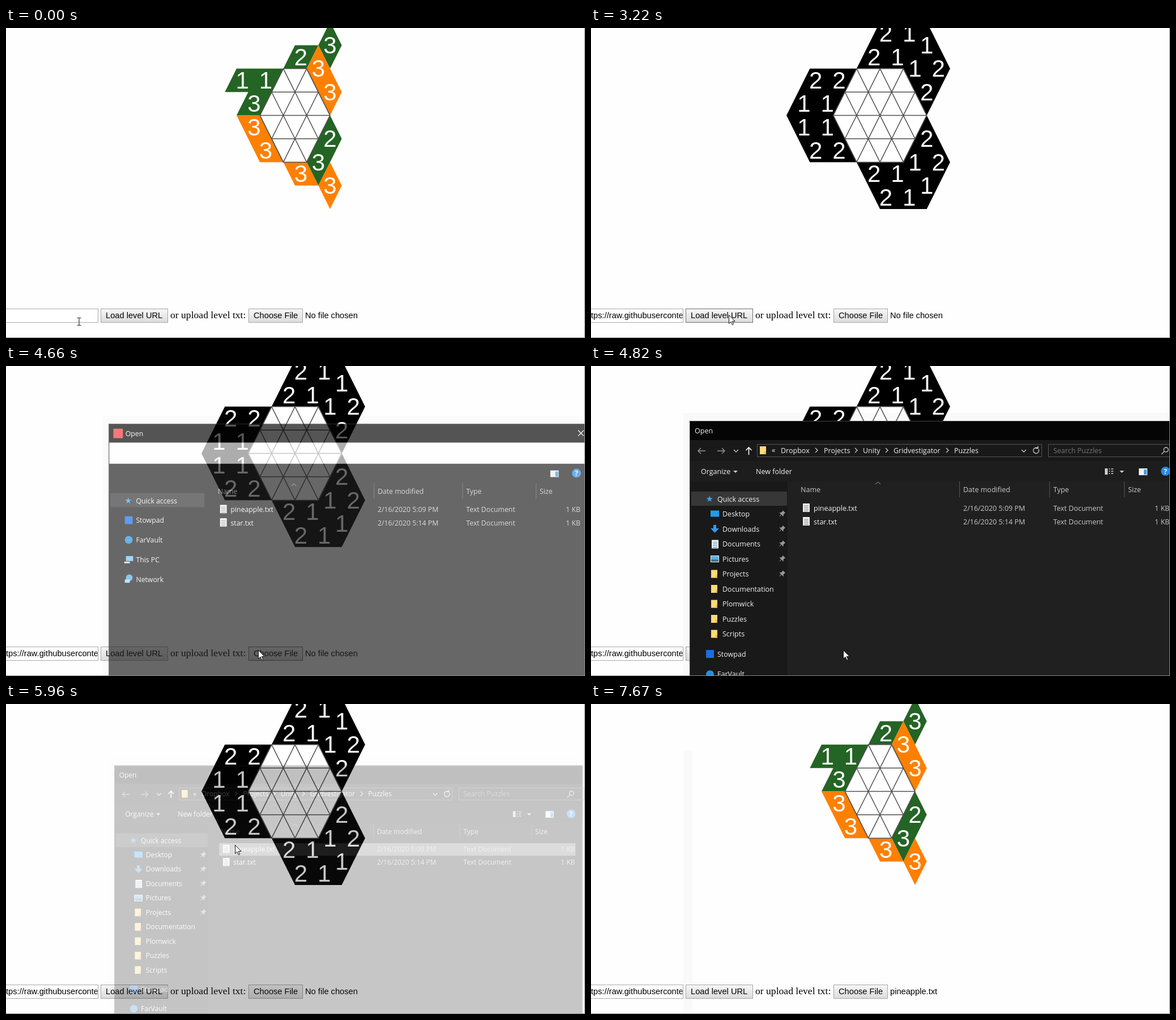
An HTML page that plays this animation: 1022 px wide and 548 px high, repeating every 7.85 s.

```html
<!DOCTYPE html>
<html lang="en">
<head>
<meta charset="utf-8">
<title>Level loader</title>
<style>
  html, body { margin: 0; width: 100%; height: 100%; overflow: hidden; background: #fefefe; }
  svg { display: block; }
  text { white-space: pre; }
  .digit { font: 42px "Liberation Sans", Arial, sans-serif; fill: #fff; text-anchor: middle; }
  .ui { font: 14.667px "Liberation Sans", Arial, sans-serif; }
  .serif { font: 17.6px "Liberation Serif", "Times New Roman", serif; }
  #dialog { font: 12.5px "Open Sans", "Noto Sans", sans-serif; fill: #f2f2f2; }
  #dialog .dim { fill: #c8c8c8; }
  .line { fill: none; stroke: #ccc; stroke-width: 1.3; }
</style>
</head>
<body>
<svg id="stage" width="1022" height="548" viewBox="0 0 1022 548"></svg>
<script>
const LOOP = 7850, STEP = 60;
const GREEN = '#246424', ORANGE = '#ff8000';
const $ = id => document.getElementById(id);
const show = (id, on) => $(id).setAttribute('visibility', on ? 'inherit' : 'hidden');
const text = (x, y, s, attrs = '') => `<text x="${x}" y="${y}" ${attrs}>${s}</text>`;
const rect = (x, y, w, h, fill, attrs = '') =>
  `<rect x="${x}" y="${y}" width="${w}" height="${h}" fill="${fill}" ${attrs}/>`;
const line = (d, attrs = '') => `<path class="line" d="${d}" ${attrs}/>`;

// ---- puzzle boards on a triangular lattice ----
const px = i => 510.1 + 20.63 * i;
const py = j => 154.5 + 41.35 * j;
const points = flat => flat.map((v, n) => n % 2 ? py(v) : px(v)).join(' ');
const poly = (fill, ...flat) => `<polygon fill="${fill}" points="${points(flat)}"/>`;

function board(id, w, shapes, digits) {
  const hex = points([-w, -2, w, -2, w + 2, 0, w, 2, -w, 2, -w - 2, 0]);
  let d = '';
  for (let j = -1; j <= 1; j++) d += `M${px(-5)} ${py(j)}H${px(5)}`;
  for (let k = -w - 2; k <= w + 2; k += 2)
    for (const s of [-2, 2]) d += `M${px(k - s)} ${py(-2)}L${px(k + s)} ${py(2)}`;
  return `<g id="${id}">${shapes}
    <clipPath id="${id}Clip"><polygon points="${hex}"/></clipPath>
    <polygon points="${hex}" fill="#fff"/>
    <path d="${d}" clip-path="url(#${id}Clip)" fill="none" stroke="#505050" stroke-width="1.5"/>
    <polygon points="${hex}" fill="none" stroke="#505050" stroke-width="1.5"/>
    ${digits.map(([n, i, j]) => text(px(i), py(j) + 14.5, n, 'class="digit"')).join('')}</g>`;
}

const pineapple = board('pineapple', 1,
  poly(GREEN, -5, -2, -1, -2, -3, 0, -5, 0, -4, -1, -6, -1) +
  poly(GREEN, 0, -3, 2, -3, 1, -2, -1, -2) +
  poly(GREEN, 3, -4, 4, -3, 3, -2, 2, -3) +
  poly(GREEN, 3, 0, 4, 1, 2, 3, 1, 2) +
  poly(ORANGE, -5, 0, -3, 0, -1, 2, -3, 2) +
  poly(ORANGE, 2, -3, 4, -1, 3, 0, 1, -2) +
  poly(ORANGE, -1, 2, 1, 2, 2, 3, 0, 3) +
  poly(ORANGE, 3, 2, 4, 3, 3, 4, 2, 3),
  [[1, -4.5, -1.5], [1, -2.5, -1.5], [3, -3.5, -.5], [3, -3.5, .5], [3, -2.5, 1.5],
   [2, .5, -2.5], [3, 2, -2], [3, 3, -1], [3, 3, -3], [2, 3, 1], [3, 2, 2], [3, .5, 2.5], [3, 3, 3]]);

const upper = [[2, -5.5, -1.5], [2, -3.5, -1.5], [1, -6.5, -.5], [1, -4.5, -.5],
  [2, .5, -3.5], [1, 2.5, -3.5], [1, 4, -3], [2, -.5, -2.5], [1, 1.5, -2.5],
  [1, 3, -2], [2, 5, -2], [2, 4, -1]];
const star = board('star', 2,
  poly('#000', -6, -2, -2, -2, -4, 0, -2, 2, -6, 2, -8, 0) +
  [-1, 1].map(s => poly('#000', -2, 2 * s, 2, 2 * s, 4, 0, 6, 2 * s, 4, 4 * s, 0, 4 * s)).join(''),
  [...upper, ...upper.map(([n, i, j]) => [n, i, -j])]);

// ---- page controls ----
const button = (id, x, w, label) =>
  rect(x + .5, 496.5, w, 24, 'url(#face)', `id="${id}" stroke="#a6a6a6"`) +
  text(x + 9, 513, label, 'class="ui"');
const squiggle = (from, to) => {
  let d = `M${from} 516`;
  for (let x = from; x < to; x += 4) d += 'l2 -2l2 2';
  return `<path d="${d}" fill="none" stroke="#e33" stroke-width="1"/>`;
};
const page = `
  <defs>
    <linearGradient id="face" x2="0" y2="1"><stop stop-color="#f7f7f7"/><stop offset="1" stop-color="#dcdcdc"/></linearGradient>
    <linearGradient id="pressed" x2="0" y2="1"><stop stop-color="#d8d8d8"/><stop offset="1" stop-color="#f2f2f2"/></linearGradient>
    <clipPath id="fieldClip"><rect y="497" width="161.5" height="24"/></clipPath>
  </defs>
  ${rect(-5, 496.5, 167.5, 24, '#fff', 'id="field"')}
  <g class="ui" clip-path="url(#fieldClip)">
    ${text(160, 513, 'er/master/Puzzles/star.txt', 'id="urlEnd" text-anchor="end"')}
    ${text(-12.2, 513, 'https://raw.githubusercontent.com', 'id="urlStart"')}
    <g id="spelling">${squiggle(0, 6)}${squiggle(117, 159)}</g>
  </g>
  ${rect(160, 499, 1.2, 17, '#000', 'id="caret"')}
  ${button('load', 167, 118, 'Load level URL')}
  ${text(290, 513, 'or upload level txt:', 'class="serif"')}
  ${button('choose', 428, 95, 'Choose File')}
  ${text(528, 513, '', 'id="file" class="ui"')}`;

// ---- file dialog ----
const folder = (x, y) => rect(x, y, 11, 14, '#ffd977') + rect(x + 8, y + 9, 3, 5, '#e9b950');
const sheet = (x, y, ink) => rect(x, y, 12, 15, '#f4f4f4') +
  line(`M${x + 2} ${y + 4}h8m-8 3h8m-8 3h8m-8 3h8`, `style="stroke:${ink};stroke-width:1"`);
const pin = y => `<path transform="translate(337 ${y}) rotate(45)" fill="#999" stroke="#999" d="M-3-5h6M-2-5v4l-2 2h8l-2-2v-4zM0 1v5"/>`;
const chevron = x => line(`M${x - 2} 145l4 4l-4 4`);
const down = (x, y) => line(`M${x - 4} ${y - 2}l4 4l4-4`);
const triangle = (x, y) => `<path d="M${x - 4} ${y - 2}h8l-4 4z" fill="#ccc"/>`;
const starIcon = text(202.5, 240, '★', 'style="font:15px \'DejaVu Sans\',sans-serif" fill="#3aa5f5"');
const blueSquare = y => rect(203, y - 7, 14, 14, '#1470e8');
const blueDot = y => `<circle cx="210" cy="${y}" r="7" fill="#2391e0"/>`;

const icons = {
  Desktop: y => rect(211, y - 6, 15, 11, '#1e9df1'),
  Downloads: y => `<path d="M216 ${y - 7}h5v6h5l-7.5 8l-7.5-8h5z" fill="#3b97e8"/>`,
  Documents: y => sheet(213, y - 7, '#3c85c8'),
  Pictures: y => rect(211, y - 6, 15, 12, '#eaf4fb') + rect(212, y - 5, 13, 6, '#58b2ea') + rect(212, y + 1, 13, 4, '#467083')
};
const places = ['Desktop', 'Downloads', 'Documents', 'Pictures', 'Projects',
  'Documentation', 'Plomwick', 'Puzzles', 'Scripts'].map((name, n) => {
    const y = 261.5 + 26.5 * n;
    return (icons[name] ? icons[name](y) : folder(212, y - 7)) + text(232, y + 4.5, name) + (n < 5 ? pin(y) : '');
  }).join('');
const crumbs = [['Dropbox', 335, 398], ['Projects', 411, 468], ['Unity', 480, 522],
  ['Gridvestigator', 534, 629], ['Puzzles', 641]]
  .map(([name, x, sep]) => text(x, 154, name) + (sep ? chevron(sep) : '')).join('');
const fileRow = (n, name, time) => {
  const y = 240 + 24 * n;
  return rect(367, y, 655, 23, 'none', `id="row${n}"`) + sheet(374, y + 3, '#777') +
    text(393, y + 16, name) +
    `<g class="dim">${text(657, y + 16, `2/16/2020 ${time} PM`)}${text(816, y + 16, 'Text Document')}${text(995, y + 16, '1 KB')}</g>`;
};

const dialog = `<g id="dialog">
  ${rect(163, 83, 870, 480, '#000', 'opacity=".02"')}
  ${rect(174, 97, 861, 470, '#202020')}
  ${rect(174, 97, 861, 34, '#050505')}
  <g id="full">
    ${rect(175, 131, 860, 37, '#191919')}
    ${rect(175, 168, 860, 36, '#1d1d1d')}
    ${rect(175, 204, 172, 360, '#191919')}
    ${text(183, 119, 'Open')}
    ${line('M202 150h-13m5-5l-5 5l5 5M223 150h13m-5-5l5 5l-5 5', 'style="stroke:#999"')}
    ${down(256, 150)}
    ${line('M278.5 157v-13m-5 5l5-5l5 5', 'style="stroke:#fff;stroke-width:1.6"')}
    ${rect(293.5, 138.5, 502, 22, 'none', 'stroke="#555"')}
    ${rect(807.5, 138.5, 230, 22, 'none', 'stroke="#555"')}
    ${folder(298, 142)}${text(319, 153, '«')}${crumbs}
    ${down(764, 150)}
    ${line('M790 147a5 5 0 1 1-5-2.5h4m0-3v4h-4')}
    ${text(816, 154, 'Search Puzzles', 'fill="#757575"')}
    <circle class="line" cx="1015" cy="148" r="4"/>${line('M1012 151l-5 5')}
    ${text(194, 191, 'Organize')}${triangle(255, 187)}${text(291, 191, 'New folder')}
    ${rect(907, 181, 5, 11, '#ccc')}
    ${line('M914 182h2m2 0h4M914 186h2m2 0h4M914 190h2m2 0h4')}
    ${triangle(937, 187)}
  </g>
  <g id="early">
    ${rect(175, 131, 860, 38, '#fff')}
    ${rect(182.5, 106, 17, 17, '#f03c3c')}
    ${text(204, 119, 'Open')}
    ${line('M1017 109l10 10m0-10l-10 10', 'style="stroke:#fff"')}
  </g>
  ${line('M1035 97.5H174.5V567', 'style="stroke:#444;stroke-width:1"')}
  ${rect(967, 181, 15, 12, '#f0f0f0')}${rect(976, 183, 5, 9, '#3d9be0')}
  <circle cx="1014" cy="186" r="8" fill="#2989e3"/>${text(1014, 191, '?', 'text-anchor="middle" font-weight="bold"')}
  ${rect(177, 222, 169, 25, '#373737')}${starIcon}${text(223, 240, 'Quick access')}
  <g id="placesFull">${places}
    ${blueSquare(509)}${text(223, 513.5, 'Stowpad')}
    ${blueDot(545)}${text(223, 549, 'FarVault')}</g>
  <g id="placesEarly">
    ${blueSquare(270.5)}${text(223, 275, 'Stowpad')}
    ${blueDot(306)}${text(223, 310.5, 'FarVault')}
    ${rect(205, 335, 13, 9, '#73c2f2')}${rect(202, 345, 10, 3, '#ddd')}${text(223, 346, 'This PC')}
    <circle cx="211" cy="374" r="6" fill="#55aee8"/>${rect(203, 377, 9, 6, '#a9d9f5')}${text(223, 381.5, 'Network')}
  </g>
  ${line('M502 209l4.5-4l4.5 4', 'style="stroke:#999;stroke-width:1"')}
  ${line('M650.5 204v28M809.5 204v28M941.5 204v28', 'style="stroke:#555;stroke-width:1"')}
  <g class="dim">${text(370, 223, 'Name')}${text(657, 223, 'Date modified')}${text(816, 223, 'Type')}${text(948, 223, 'Size')}</g>
  ${fileRow(0, 'pineapple.txt', '5:09')}${fileRow(1, 'star.txt', '5:14')}
</g>`;

const pointer = `<g id="pointer">
  <path id="beam" d="M-3.5-6.5h3l.5.5l.5-.5h3M0-6V6M-3.5 6.5h3l.5-.5l.5.5h3" fill="none" stroke="#222" stroke-width="1.1"/>
  <path id="arrow" d="M.5.5v15l3.5-3.3l2.4 5.5l2.3-1l-2.4-5.3h4.8z" fill="#fff" stroke="#111"/>
  <g id="busy"><circle r="6.5" cx="-1" cy="0" fill="#fff" stroke="#2b8df0" stroke-width="5"/>
    <path d="M-7.5 0a6.5 6.5 0 0 1 6.5-6.5" fill="none" stroke="#45b4f5" stroke-width="5"/></g>
</g>`;

$('stage').innerHTML = rect(0, 0, 1022, 548, '#fefefe') +
  rect(163, 83, 16, 465, '#fafafa', 'id="trace"') + pineapple + star + page + dialog +
  '<path d="M1021.5 0V547.5H0" fill="none" stroke="#8a8a8a"/>' + pointer;

// ---- pointer path: start, steps, x, y, upward bow ----
const moves = [
  [60, 13, 96, 512, 0], [1390, 1, 99, 513, 0], [1440, 1, 96, 512, 0],
  [1810, 4, 238, 508.5, 0], [3220, 11, 445, 502, 20], [4990, 8, 404, 249, 0],
  [6270, 3, 462, 368, 0], [6950, 13, 978, 552, 0]
];
function pointerAt(t) {
  let x = 129, y = 519;
  for (const [start, steps, tx, ty, bow] of moves) {
    if (t < start) break;
    const p = Math.min(1, (Math.floor((t - start) / STEP) + 1) / steps);
    const e = p * p * (3 - 2 * p);
    x += (tx - x) * e;
    y += (ty - y) * e - bow * Math.sin(Math.PI * e);
  }
  return [x, y];
}

function dialogOpacity(t) {
  if (t < 4540 || t >= 6020) return 0;
  if (t >= 5900) return .5 * (6020 - t) / 120;
  return Math.min(1, .22 + .23 * Math.floor((t - 4540) / STEP));
}

function paintButton(id, hover, down) {
  $(id).setAttribute('fill', down ? 'url(#pressed)' : 'url(#face)');
  $(id).setAttribute('stroke', hover ? '#707070' : '#a6a6a6');
}

function draw(t) {
  const between = (a, b) => t >= a && t < b;
  const [x, y] = pointerAt(t);
  const starOn = between(2540, 6020);
  show('star', starOn);
  show('pineapple', !starOn);
  show('trace', t >= 6020);

  const focused = between(600, 2420);
  $('field').setAttribute('stroke', focused ? '#4a8ae0' : '#a9a9a9');
  $('field').setAttribute('stroke-width', focused ? 1.5 : 1);
  show('urlEnd', between(1080, 2420));
  show('spelling', between(1140, 2420));
  show('urlStart', t >= 2420);
  show('caret', between(1080, 1630) || between(2170, 2420));

  const overBar = y > 496 && y < 521;
  paintButton('load', overBar && x > 167 && x < 286, between(2420, 2540));
  paintButton('choose', overBar && x > 428 && x < 524, between(4060, 4180));
  $('file').textContent = t < 6020 ? 'No file chosen' : 'pineapple.txt';

  const alpha = dialogOpacity(t), scale = 1 - .053 * (1 - alpha), full = t >= 4780;
  show('dialog', alpha > 0);
  $('dialog').setAttribute('opacity', alpha);
  $('dialog').setAttribute('transform', `translate(600 391) scale(${scale}) translate(-600 -391)`);
  for (const id of ['full', 'placesFull']) show(id, full);
  for (const id of ['early', 'placesEarly']) show(id, !full);
  for (const n of [0, 1]) {
    const over = t >= 4990 && y >= 240 + 24 * n && y < 264 + 24 * n;
    $('row' + n).setAttribute('fill', !over ? 'none' : t >= 5720 ? '#777' : '#4d4d4d');
  }

  const busy = between(6020, 6270), beam = x < 164;
  show('beam', beam);
  show('busy', busy);
  show('arrow', !busy && !beam);
  $('pointer').setAttribute('transform', `translate(${Math.round(x)} ${Math.round(y)})`);
}

function tick() {
  draw(performance.now() % LOOP);
  requestAnimationFrame(tick);
}
tick();
</script>
</body>
</html>
```
